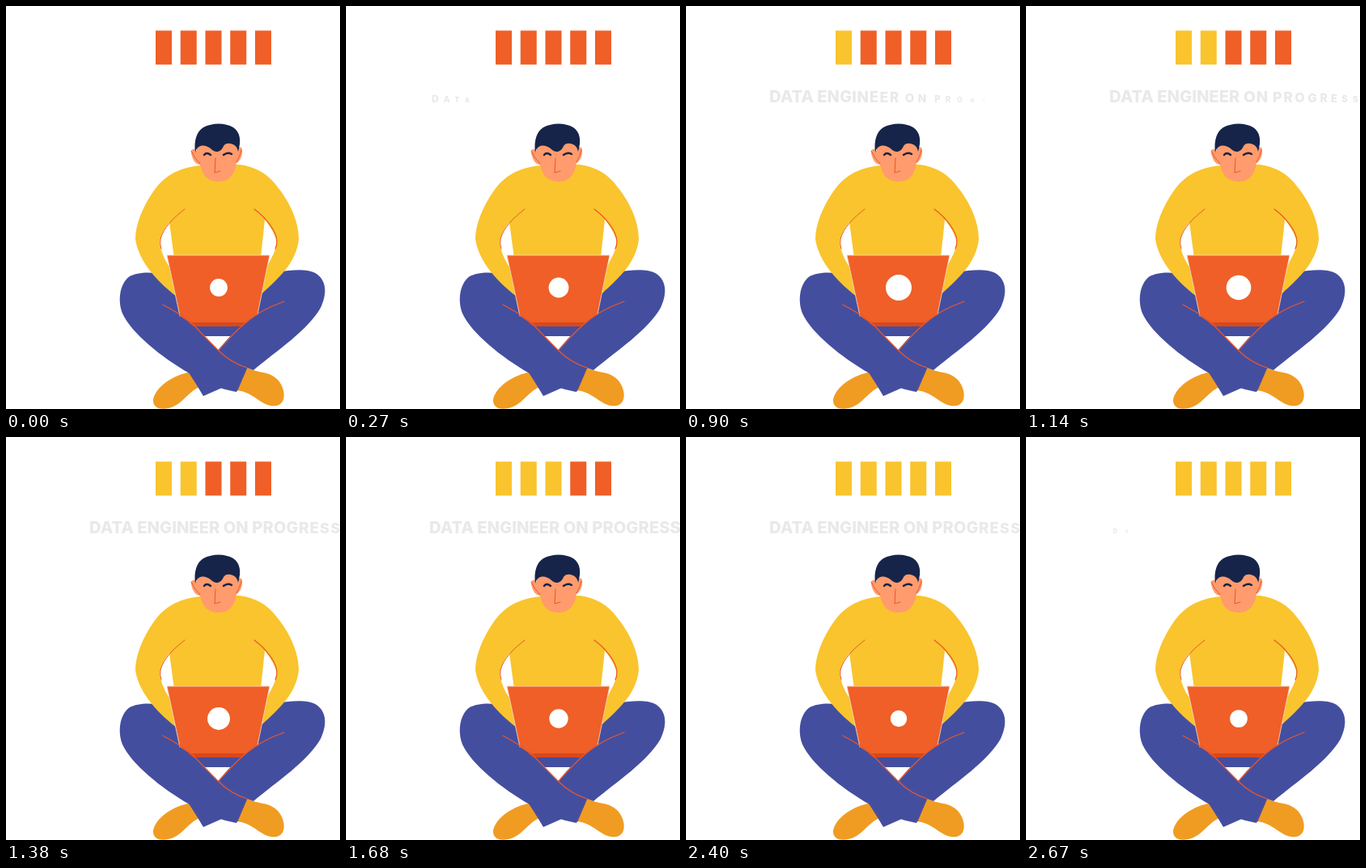
Write an HTML page with a canvas that moves like this. It is 413 by 498 pixels and loops after 2.7 s.

```html
<!DOCTYPE html>
<html lang="en">
<head>
<meta charset="utf-8">
<title>Data engineer on progress</title>
<style>
  html, body { margin: 0; width: 100%; height: 100%; overflow: hidden; background: #fff; }
  canvas { display: block; width: 413px; height: 498px; }
</style>
</head>
<body>
<canvas id="stage"></canvas>
<script>
const W = 413, H = 498, LOOP = 2700;
const canvas = document.getElementById('stage');
const ctx = canvas.getContext('2d');
const ratio = window.devicePixelRatio || 1;
canvas.width = W * ratio;
canvas.height = H * ratio;

const ORANGE = '#ef5f27', YELLOW = '#f9c42d', BLUE = '#444e9f', FOOT = '#f09c22',
      SKIN = '#ff9b6d', NAVY = '#16244a', LINE = '#e9572b', WHITE = '#fff';

function fill(path, color) {
  ctx.fillStyle = color;
  ctx.fill(new Path2D(path));
}

function stroke(path, color = LINE, width = 1.2) {
  ctx.strokeStyle = color;
  ctx.lineWidth = width;
  ctx.lineCap = ctx.lineJoin = 'round';
  ctx.stroke(new Path2D(path));
}

function drawLegs() {
  fill('M230 452 C214 454 187 466 182 486 C181 499 195 500 207 495 C220 489 226 476 241 470 Z', FOOT);
  fill('M297 446 C312 455 326 450 337 463 C346 474 347 492 334 494 C315 496 308 477 285 475 Z', FOOT);
  // right shin passes behind the left one
  fill('M310 336 C335 327 370 322 384 331 C398 341 396 358 389 373 C373 401 336 425 306 450 ' +
       'L298 447 L278 467 L244 482 L227 454 L262 425 L280 405 L232 408 L232 385 Z', BLUE);
  fill('M212 341 C196 327 166 327 153 334 C140 343 138 365 144 380 C155 404 192 434 227 454 ' +
       'C247 466 264 473 285 477 L298 447 C285 442 274 436 262 425 L245 408 L293 408 L293 385 Z', BLUE);
  fill('M246 409 L275 408 L263 425 Z', WHITE);
  stroke('M227 454 L239 472', '#5a4d94', 1);
  stroke('M286 475 L298 447', '#5a4d94', 1);
}

function drawBody() {
  fill('M240 197 C212 200 195 211 183 228 C169 248 160 270 160 288 C163 311 181 336 211 359 ' +
       'L220 320 L308 320 L317 355 C336 337 359 318 362 288 C362 264 349 240 336 224 ' +
       'C324 207 309 199 289 196 Z', YELLOW);
  fill('M202 267 C193 279 189 287 191 298 C193 306 197 315 201 321 L208 312 Z', WHITE);
  fill('M320 264 C331 278 336 289 334 297 C332 306 326 315 322 324 L315 311 Z', WHITE);
  stroke('M221 251 C208 261 195 273 191 288 Q190 295 192 300', LINE, 1);
  stroke('M307 251 C322 262 334 278 335 290 Q335 296 333 300');
}

function drawHead() {
  fill('M236 179 C233 175 228 177 229 182 C231 191 235 196 240 196 ' +
       'C243 211 251 217 263 217 C276 217 283 208 285 194 ' +
       'C290 192 293 183 292 177 C291 174 289 174 287 176 L284 164 L236 164 Z', SKIN);
  fill('M234 181 C232 166 236 155 244 150 C255 144 271 144 281 150 ' +
       'C290 156 291 167 287 180 C286 169 272 167 269 173 C266 181 259 182 254 177 ' +
       'C247 171 237 170 234 181 Z', NAVY);
  stroke('M245 184 Q248 180 253 184', NAVY, 2.4);
  stroke('M269 184 Q274 180 279 183', NAVY, 2.4);
  stroke('M259 188 L258 206 L265 204', LINE, 1);
  stroke('M229 179 Q232 187 240 195', LINE, 1);
  stroke('M291 178 Q289 187 285 193', LINE, 1);
}

function drawLaptop() {
  fill('M199 308 L326 308 L311 381 L294 393 L230 393 L215 383 Z', ORANGE);
  stroke('M215 383 L199 308 L326 308 L311 381', '#f9d3b8', 0.9);
  fill('M225 391 L297 391 L292 396 L232 396 Z', '#d8481b');
  stroke('M194 369 C206 376 220 383 231 393 C244 407 254 417 262 425 C274 437 285 443 298 447');
  stroke('M344 365 C324 372 306 382 292 395 C280 406 272 415 263 425');
}

// Width of the lid mark over time
const pulse = [[0, 32], [480, 40], [900, 47], [1000, 47.5], [1380, 41], [2010, 27], [2400, 30], [LOOP, 32]];

function markWidth(t) {
  const i = pulse.findIndex(key => key[0] > t);
  const [t0, w0] = pulse[i - 1], [t1, w1] = pulse[i];
  return w0 + (w1 - w0) * (t - t0) / (t1 - t0);
}

function drawMark(t) {
  ctx.fillStyle = WHITE;
  ctx.beginPath();
  ctx.arc(263, 348, markWidth(t) * 0.34, 0, Math.PI * 2);
  ctx.fill();
}

function drawBars(t) {
  for (let i = 0; i < 5; i++) {
    ctx.fillStyle = t >= 480 * (i + 1) ? YELLOW : ORANGE;
    ctx.fillRect(185 + i * 30.75, 30.4, 20, 42);
  }
}

const TITLE = 'DATA ENGINEER ON PROGRESS';

function drawTitle(t) {
  // letters grow in one by one, then the same motion runs back faster
  const clock = Math.min(t, 1380 - (t - 2400) * 4.5);
  ctx.font = '800 20.2px Inter, sans-serif';
  ctx.textAlign = 'center';
  ctx.fillStyle = '#e9e9e9';
  [...TITLE].forEach((letter, i) => {
    const age = clock - 80 - i * 38;
    if (age <= 0 || letter === ' ') return;
    const end = ctx.measureText(TITLE.slice(0, i + 1)).width;
    const x = 103 + end - ctx.measureText(letter).width / 2;
    const scale = 0.2 + 0.8 * (1 - (1 - Math.min(age / 680, 1)) ** 2);
    ctx.save();
    ctx.globalAlpha = Math.min(age / 60, 1);
    ctx.translate(x, 119);
    ctx.scale(scale, scale);
    ctx.fillText(letter, 0, 0);
    ctx.restore();
  });
}

function draw(t) {
  ctx.setTransform(ratio, 0, 0, ratio, 0, 0);
  ctx.fillStyle = WHITE;
  ctx.fillRect(0, 0, W, H);
  drawBars(t);
  drawTitle(t);
  drawLegs();
  drawBody();
  drawHead();
  drawLaptop();
  drawMark(t);
}

const start = performance.now();
function frame() {
  draw((performance.now() - start) % LOOP);
  requestAnimationFrame(frame);
}
frame();
</script>
</body>
</html>
```
